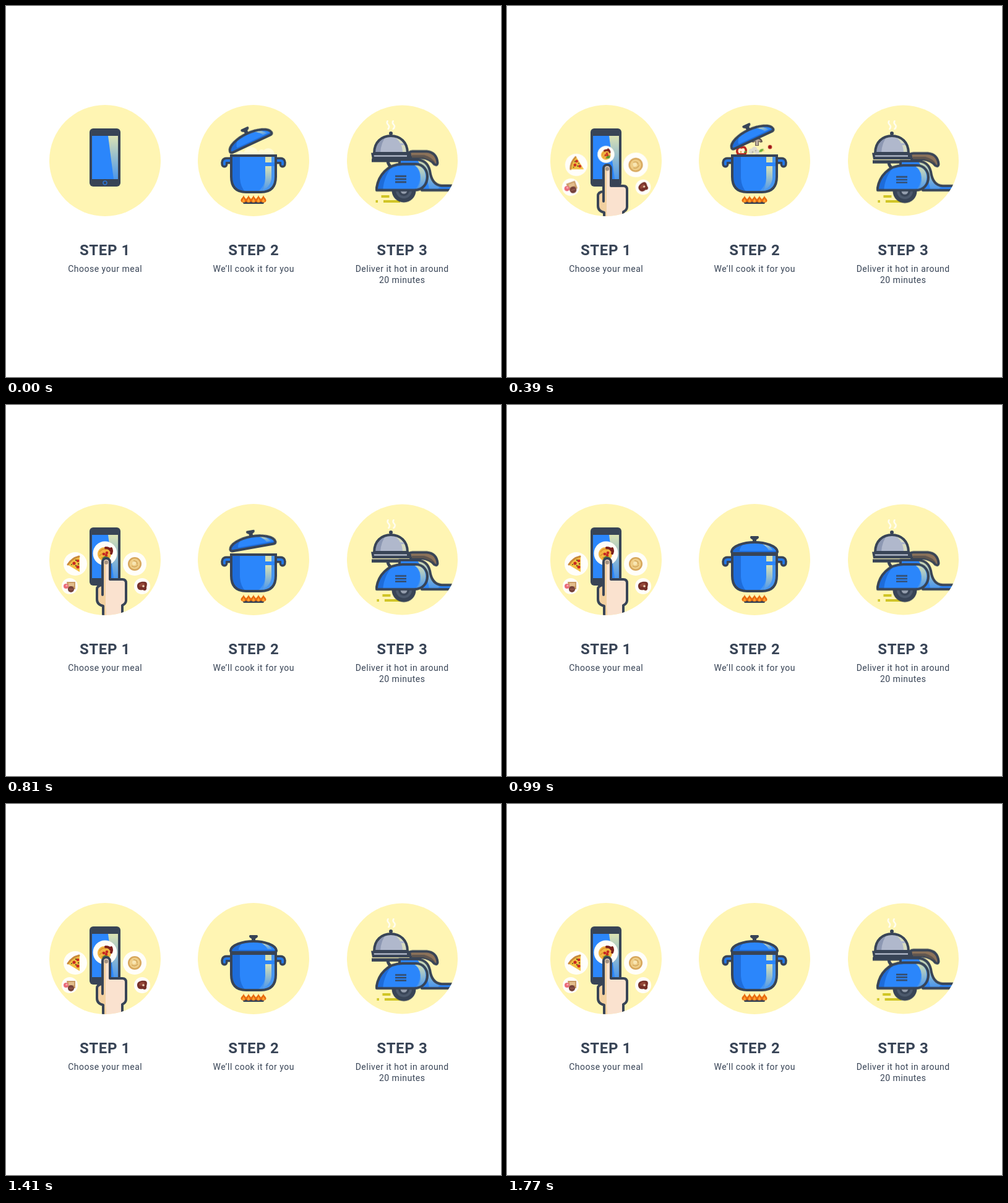
Write an HTML page that moves like this. It is 800 by 600 pixels and loops after 1.8 s.

```html
<!DOCTYPE html>
<html lang="en">
<head>
<meta charset="utf-8">
<title>Three steps</title>
<style>
  html, body { margin: 0; width: 100%; height: 100%; overflow: hidden; background: #fff; }
  svg { display: block; width: 100vw; height: 100vh; }
  text { font-family: Roboto, Inter, sans-serif; fill: #384456; text-anchor: middle; }
  .step { font-weight: 700; font-size: 24px; letter-spacing: .6px; }
  .note { font-size: 14px; letter-spacing: .5px; }
  .ink { fill: #384456; }
  .line { fill: none; stroke: #384456; stroke-width: 4; stroke-linejoin: round; stroke-linecap: round; }
  .blue { fill: #2b86fb; }
  .deep { fill: #1e6cd9; }
  .shine { fill: url(#shine); }

  .hand, .pop, .lid, .fall, .puffs { animation: 1.8s linear infinite; }

  /* phone */
  .hand { animation-name: hand; }
  @keyframes hand {
    0%, 5% { transform: translateY(100px); animation-timing-function: cubic-bezier(.3, .4, .6, .9); }
    21.67% { transform: translateY(9px); animation-timing-function: ease-out; }
    28%, 100% { transform: none; }
  }
  .pop { animation-name: pop; }
  @keyframes pop {
    0%, 3% { transform: scale(0) rotate(-140deg); animation-timing-function: ease-out; }
    21.67% { transform: scale(var(--mid, 1)) rotate(var(--turn, -20deg)); animation-timing-function: ease-out; }
    32%, 100% { transform: none; }
  }
  .pop.dish { animation-name: dish; }
  @keyframes dish {
    0%, 13% { transform: scale(0) rotate(-60deg); }
    21.67% { transform: scale(.7) rotate(-30deg); animation-timing-function: ease-out; }
    30%, 100% { transform: none; }
  }

  /* pot */
  .lid { animation-name: lid; }
  @keyframes lid {
    0% { transform: translate(396px, 221px) rotate(-25deg); animation-timing-function: ease-out; }
    10%, 21.67% { transform: translate(397px, 215px) rotate(-25deg); }
    35% { transform: translate(398px, 216px) rotate(-23deg); }
    38% { transform: translate(398px, 216px) rotate(-23deg); animation-timing-function: ease-in; }
    48%, 100% { transform: translate(400px, 238px) rotate(0deg); }
  }
  .fall { animation-name: fall; }
  @keyframes fall {
    0%, 8% { transform: translateY(var(--a)) scale(0); }
    21.67% { transform: translateY(var(--b)) scale(var(--size, 1)); }
    35% { transform: translateY(var(--c)) scale(1); animation-timing-function: ease-in; }
    43%, 100% { transform: translateY(262px) scale(1); }
  }
  .puffs { animation-name: puffs; }
  @keyframes puffs {
    0% { opacity: .65; transform: none; }
    8%, 100% { opacity: 0; transform: translateY(-5px); }
  }
  .flame { animation: flame 75ms ease-in-out infinite alternate; }
  @keyframes flame { from { transform: none; } to { transform: scaleY(.92); } }

  /* scooter */
  .body, .wheel, .dash, .steam { animation: 75ms ease-in-out infinite alternate; }
  .body { animation-name: body; transform-origin: 640px 300px; }
  @keyframes body { from { transform: scaleY(1.055); } to { transform: none; } }
  .wheel { animation-name: wheel; }
  @keyframes wheel { from { transform: translateY(-.8px); } to { transform: translateY(.4px); } }
  .dash { animation-name: dash; }
  @keyframes dash { from { stroke-dashoffset: 0; transform: translateX(-1px); } to { transform: translateX(1px); } }
  .steam { animation-name: steam; animation-duration: 300ms; }
  @keyframes steam { from { transform: translateX(-.4px); } to { transform: translateX(.6px); } }
</style>
</head>
<body>
<svg viewBox="0 0 800 600">
  <defs>
    <linearGradient id="shine" x1="0" y1="0" x2="0" y2="1">
      <stop offset="0" stop-color="#dbe2b2"/>
      <stop offset="1" stop-color="#4c97ec"/>
    </linearGradient>
    <clipPath id="disc1"><circle cx="160" cy="250" r="90"/></clipPath>
    <clipPath id="disc3"><circle cx="640.5" cy="250" r="89.5"/></clipPath>
    <clipPath id="abovePot"><path d="M310 160H490V242H310Z"/></clipPath>
    <clipPath id="potIn"><path d="M364 242H436V276Q436 301 412 301H388Q364 301 364 276Z"/></clipPath>
    <clipPath id="fenderIn"><path id="fender" d="M599 298V294C602 276 616 258 641 258H662C675 258 681 268 681 277C681 289 673 298 660 298Z"/></clipPath>
    <clipPath id="domeIn"><path id="dome" d="M595 238C595 220 607 210 622 210S649 220 649 238Z"/></clipPath>
    <clipPath id="lidIn"><path id="lidShape" d="M-37 -1C-36 -10 -18 -16 0 -16S36 -10 37 -1Q37 2 33 2H-33Q-37 2 -37 -1Z"/></clipPath>
    <path id="handle" d="M363 250H356Q352 250 353 256"/>
    <g id="fire">
      <path fill="#e8690c" d="M0 -11C1 -7 4.500 -6 4.500 -2.500C4.500 2 -4.500 2 -4.500 -2.500C-4.500 -6 -1 -7 0 -11Z"/>
      <path fill="#ffa231" d="M0 -6.500C.5 -4 2.200 -3.500 2.200 -1.500C2.200 1 -2.200 1 -2.200 -1.500C-2.200 -3.500 -.5 -4 0 -6.500Z"/>
    </g>
  </defs>

  <g fill="#fff5b3">
    <circle cx="160" cy="250" r="90"/>
    <circle cx="400" cy="250" r="90"/>
    <circle cx="640.5" cy="250" r="89.500"/>
  </g>

  <!-- choose -->
  <g clip-path="url(#disc1)">
    <rect class="ink" x="135" y="198" width="50" height="94" rx="6"/>
    <path class="blue" d="M139 210H181V280H139Z"/>
    <path class="shine" d="M165 210H181V280H174Z"/>
    <circle cx="160" cy="286" r="3" fill="none" stroke="#2b76d6" stroke-width="1.500"/>

    <g transform="translate(112 257)"><g class="pop" style="--mid:.95;--turn:-32deg">
      <circle r="19" fill="#fffefa"/>
      <path fill="#f3c044" d="M-13 1Q-6 -10 7 -13V13Z"/>
      <path fill="none" stroke="#c98a3a" stroke-width="3" stroke-linecap="round" d="M-12 1Q-6 -9 6 -12"/>
      <g fill="#c82a22"><circle cx="-2" cy="-1" r="2.600"/><circle cx="4" cy="-5" r="2.300"/><circle cx="4" cy="5" r="2.500"/></g>
      <g fill="#5c5a26"><circle cx="1" cy="-6" r="1.200"/><circle cx="1" cy="3" r="1.200"/><circle cx="5" cy="0" r="1.200"/><circle cx="-6" cy="1" r="1"/></g>
    </g></g>
    <g transform="translate(208 257)"><g class="pop" style="--mid:1.05">
      <circle r="19" fill="#fffefa"/>
      <circle r="11" fill="#d7a75c"/>
      <circle r="8.500" fill="#efce88"/>
      <path fill="none" stroke="#d2a65c" stroke-width="1.500" d="M-5 3Q0 7 5 2M-2 -5Q5 -5 4 1"/>
      <circle cx="-1" cy="-1" r="3" fill="#f8e6b4"/>
    </g></g>
    <g transform="translate(103 293)"><g class="pop" style="--mid:1.08">
      <circle r="13" fill="#fffefa"/>
      <path fill="#c99a66" d="M-5 -7H9V5H-3Z"/>
      <path fill="#e2bd8c" d="M-2 -5H7V0H-2Z"/>
      <circle cx="-6" cy="0" r="4" fill="#ea6a78"/>
      <circle cx="-5" cy="-1" r="1.600" fill="#f6aab0"/>
      <circle cx="2" cy="5" r="5" fill="#74413a"/>
      <path stroke="#a8685a" d="M-1 5H5"/>
    </g></g>
    <g transform="translate(220 293)"><g class="pop" style="--mid:.95;--turn:-30deg">
      <circle r="13" fill="#fffefa"/>
      <path fill="#753029" d="M-8 1C-9 -7 0 -8 5 -7C9 -6 8 -2 7 2C8 7 4 8 1 6C-3 7 -7 6 -8 1Z"/>
      <path fill="#95483a" d="M-5 0C-5 -5 1 -6 4 -4C5 -1 0 3 -5 0Z"/>
      <circle cx="2" cy="0" r="1.800" fill="#efd3b8"/>
    </g></g>
    <g transform="translate(160 240)"><g class="pop dish">
      <circle r="19.500" fill="#fffdf8"/>
      <circle cx="-1" cy="1" r="11" fill="#f4b644"/>
      <path fill="none" stroke="#dd912b" stroke-width="1.500" d="M-9 -2Q-4 -9 2 -6M-9 4Q-4 -2 3 1M-6 8Q0 3 6 6"/>
      <path fill="none" stroke="#7c201d" stroke-width="4" stroke-linecap="round" d="M1 -9Q7 -9 9 -5M10 -8Q12 -4 10 0"/>
      <path fill="#58952f" d="M-5 8L0 4L7 7L3 12Z"/>
      <g fill="#c72a21"><circle cx="-2" cy="1" r="2.300"/><circle cx="3" cy="-1" r="2.300"/><circle cx="2" cy="3" r="2.300"/></g>
    </g></g>

    <g class="hand">
      <path fill="#fae2cf" d="M158 342V325Q147 323 147 314V298Q147 292 156 291V254A6 6 0 0 1 168 254V282H188Q194 282 194 288V316Q194 321 188 324V342Z"/>
      <path fill="#f2d0a0" d="M149 296L154 292V308H158V254L161 250V326Q162 334 162 342H158V325Q149 323 149 314Z"/>
      <path class="line" stroke-linecap="butt" d="M157 342V325Q147 323 147 314V298Q147 292 156 291M156 307V254A6 6 0 0 1 168 254V282H188Q194 282 194 288V316Q194 321 188 324V342"/>
      <circle cx="162" cy="254.500" r="3.200" fill="#a59384"/>
    </g>
  </g>

  <!-- cook -->
  <g clip-path="url(#abovePot)">
    <g class="puffs" fill="#fffde9">
      <circle cx="396" cy="240" r="12"/><circle cx="413" cy="238" r="6"/><circle cx="424" cy="240" r="10"/><circle cx="380" cy="242" r="7"/>
    </g>
    <g transform="translate(404 0)"><g class="fall" style="--a:205px;--b:219px;--c:234px">
      <path fill="#66584f" d="M-9 1C-9 -9 9 -9 9 1Q5 3 3 0V7H-3V0Q-5 3 -9 1Z"/>
      <path fill="#b9aa9c" d="M-6 0C-6 -5 6 -5 6 0L2 -1V6H-2V-1Z"/>
    </g></g>
    <g transform="translate(379 0)"><g class="fall" style="--a:222px;--b:234px;--c:239px">
      <path fill="none" stroke="#b92720" stroke-width="3.500" d="M-6 5C-9 -1 -6 -7 0 -5C6 -8 9 -2 6 5Z"/>
      <path fill="#fff0d6" d="M-4 4C-6 0 -4 -4 0 -3C4 -5 6 -1 4 4Z"/>
      <circle cx="-1" cy="2" r="1.500" fill="#e9a14a"/>
      <path stroke="#5c9c35" stroke-width="2" d="M4 3L8 1"/>
    </g></g>
    <g transform="translate(399 0)"><g class="fall" style="--a:220px;--b:235px;--c:238px">
      <g fill="#dedbcf"><circle cx="-4" r="4.500"/><circle cx="1" cy="-3" r="4.500"/><circle cx="5" cy="1" r="4"/></g>
      <g fill="#bcb8a8"><circle cx="-2" cy="1" r="1.500"/><circle cx="3" cy="-1" r="1.300"/></g>
    </g></g>
    <g transform="translate(411 0)"><g class="fall" style="--a:222px;--b:234px;--c:237px;--size:.75">
      <path fill="#6fae3c" d="M-5 3Q-4 -5 5 -4Q4 4 -5 3Z"/>
      <circle cx="5" cy="0" r="1.600" fill="#f1d26a"/>
    </g></g>
    <g transform="translate(425 0)"><g class="fall" style="--a:224px;--b:228px;--c:231px;--size:.4">
      <circle r="8" fill="#b51f1d"/>
      <path fill="none" stroke="#6f1718" stroke-width="1.500" d="M-5 -2Q0 -6 5 -2M-4 2H4M0 -4V4"/>
    </g></g>
  </g>
  <g id="pot">
    <g id="ear" fill="none" stroke-linecap="round">
      <use href="#handle" stroke="#384456" stroke-width="11"/>
      <use href="#handle" stroke="#2378e8" stroke-width="4"/>
    </g>
    <use href="#ear" transform="matrix(-1 0 0 1 800 0)"/>
    <g clip-path="url(#potIn)">
      <path class="blue" d="M362 240H438V304H362Z"/>
      <path class="deep" d="M362 240H378V278Q379 295 390 304H362Z"/>
      <path fill="#4796f0" d="M419 242V278Q418 294 404 302H426L438 285V242Z"/>
      <path fill="#dbe2b2" d="M419 244H429V253H419Z"/>
      <path class="shine" d="M419 259H429V278Q428 292 414 299Q419 290 419 278Z"/>
      <path class="blue" d="M419 253H436V259H419Z"/>
    </g>
    <path class="line" d="M364 242H436V276Q436 301 412 301H388Q364 301 364 276Z" style="stroke-linejoin:miter"/>
  </g>
  <g class="lid">
    <path class="ink" d="M-6 -26H6Q8 -24 6 -22L3 -20V-15H-3V-20L-6 -22Q-8 -24 -6 -26Z"/>
    <use href="#lidShape" class="blue"/>
    <g clip-path="url(#lidIn)">
      <path class="deep" d="M-38 3V-16H-14Q-24 -9 -24 -2L-18 3Z"/>
      <path class="shine" d="M12 -14Q24 -12 30 -3H23Q21 -8 12 -14Z"/>
      <path class="deep" d="M-38 -2H38V3H-38Z"/>
    </g>
    <use href="#lidShape" class="line"/>
  </g>
  <path class="line" d="M385 318H415"/>
  <g transform="translate(384 317)"><use href="#fire" class="flame"/></g>
  <g transform="translate(392 317)"><use href="#fire" class="flame"/></g>
  <g transform="translate(400 317)"><use href="#fire" class="flame"/></g>
  <g transform="translate(408 317)"><use href="#fire" class="flame"/></g>
  <g transform="translate(416 317)"><use href="#fire" class="flame"/></g>

  <!-- deliver -->
  <g clip-path="url(#disc3)">
    <g fill="none" stroke="#d0c526" stroke-width="4">
      <path class="dash" d="M607.500 308H620.500M598.500 316H602"/>
      <path class="dash" d="M611 316H638"/>
    </g>
    <g class="wheel">
      <circle class="ink" cx="643" cy="299" r="19.500"/>
      <circle cx="643" cy="299" r="13" fill="#4d5a6d"/>
      <circle class="ink" cx="643" cy="299" r="9"/>
      <circle cx="643" cy="299" r="5.500" fill="#98a1b0"/>
    </g>
    <g class="body">
      <path class="line" d="M617 254Q618 261 626 264" style="stroke-width:5"/>
      <path class="ink" d="M591 249.500H652V255H591Z"/>
      <path fill="#8d735a" stroke="#384456" stroke-width="4" stroke-linejoin="round" d="M652 240Q654 238.500 657 238.500H680Q696 240 697.500 256Q697 261 692 258Q686 250 672 248H654Z"/>
      <path fill="#5f5650" d="M656 244H676Q688 247 694 256Q687 252 674 248H656Z"/>
      <path class="blue" d="M636 258V251H664Q681 252 685 268Q688 290 704 291H726V298H672Z"/>
      <path class="shine" d="M664 251Q680 252 684 270Q687 290 702 292L698 296H684Q680 270 664 251Z"/>
      <path class="line" d="M636 258V251H664Q681 252 685 268Q688 290 704 291H726M726 298H672"/>
      <use href="#fender" class="blue"/>
      <g clip-path="url(#fenderIn)">
        <path class="deep" d="M596 300V255H630Q610 274 609 300Z"/>
        <path fill="#4796f0" d="M655 256Q668 262 669 277Q669 292 658 300H684V256Z"/>
        <path class="shine" d="M657 258Q678 260 678 277Q678 291 664 297Q671 288 670 277Q669 263 657 258Z"/>
      </g>
      <use href="#fender" class="line"/>
      <path class="line" stroke-linecap="butt" style="stroke-width:2.2;stroke-linecap:butt" d="M629 276.500H647M629 281H647M629 285.500H647"/>
    </g>
    <use href="#dome" fill="#b0b8cc"/>
    <g clip-path="url(#domeIn)">
      <path fill="#8d98b3" d="M593 240V208H617Q605 220 605 240Z"/>
      <path fill="#d6dbc0" d="M627 211Q646 216 647 237H641Q641 221 627 211Z"/>
      <path fill="#b0b8cc" d="M634 222H648V225H634Z"/>
    </g>
    <use href="#dome" class="line"/>
    <circle class="ink" cx="622" cy="206" r="3"/>
    <path class="ink" d="M590 237.500H653V248H592Z"/>
    <path fill="#c3cad9" d="M594.500 241.500H648V243.500H595Z"/>
    <g class="steam" fill="none" stroke="#fff" stroke-width="2.400" stroke-linecap="round" opacity=".9">
      <path d="M617 186Q615 189 618 192T618 199"/>
      <path d="M626 186Q624 189 627 192T626 199"/>
    </g>
  </g>

  <g class="step">
    <text x="160" y="403">STEP 1</text>
    <text x="400.300" y="403">STEP 2</text>
    <text x="640.300" y="403">STEP 3</text>
  </g>
  <g class="note">
    <text x="160.200" y="430">Choose your meal</text>
    <text x="400.200" y="430">We’ll cook it for you</text>
    <text x="640.200" y="430">Deliver it hot in around</text>
    <text x="640.200" y="448">20 minutes</text>
  </g>
</svg>
</body>
</html>
```
